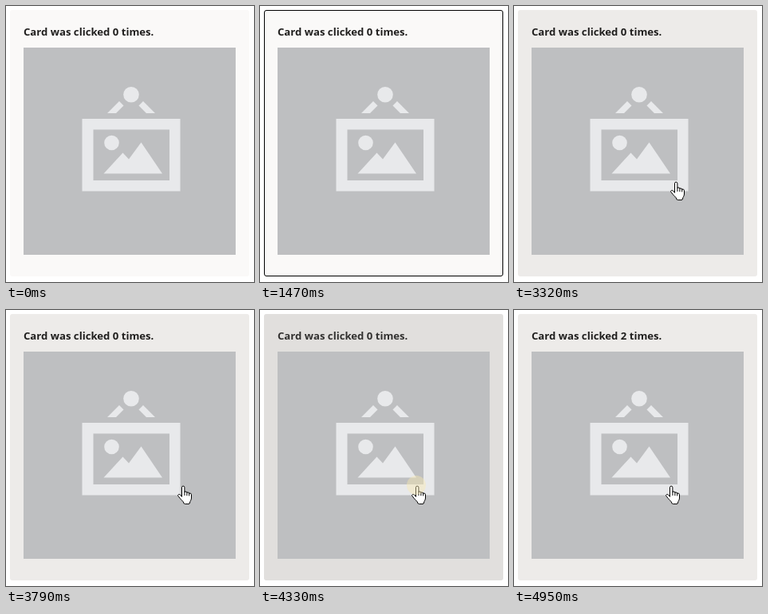
Write an HTML page that moves like this. It is 311 by 345 pixels and loops after 6120 ms.

```html
<!DOCTYPE html>
<html lang="en">
<head>
<meta charset="utf-8">
<title>Clickable card</title>
<style>
  html, body { margin: 0; width: 100%; height: 100%; overflow: hidden; background: #fff; }
  svg { display: block; }
  text { font: 700 13.15px "Open Sans", "Noto Sans", sans-serif; white-space: pre; }
</style>
</head>
<body>
<svg width="311" height="345" viewBox="0 0 311 345">
  <rect id="card" x="5" y="5" width="300" height="333" rx="3"/>
  <rect id="focus" x="5.5" y="5.5" width="299" height="332" rx="2.5" fill="none" stroke="#000"/>
  <text id="label" x="22" y="37"></text>

  <rect x="22" y="52" width="266" height="259" fill="#bebfc1"/>
  <g fill="#e8e9eb">
    <circle cx="157" cy="110.7" r="9.8"/>
    <path d="M127 134 142 119 147.500 124.500 138 134ZM187 134 172 119 166.500 124.500 176 134Z"/>
    <path fill-rule="evenodd" d="M95.500 141H218.500V231.500H95.500ZM109.500 154.500V218H205V154.500Z"/>
    <circle cx="132.500" cy="171" r="9.300"/>
    <path d="M122.500 209.500 146.500 183.500 154 191.500 169.500 170.500 196 209.500Z"/>
  </g>

  <g id="hand" stroke="#000" stroke-linejoin="round" stroke-linecap="round">
    <path fill="#fff" d="M5.500 14V2.800a1.700 1.700 0 0 1 3.400 0V8.200
      q2.600-.9 3 .9 2.500-.7 2.800 1 2.800-.5 2.800 1.700V16
      c0 3-2 4-2 6q-.2 1.400-1.500 1.400H9.500q-1.500 0-1.700-1.400
      C7 19.500 4.500 18.500 3.300 16.500L.9 13.600c-1-1.600 1-3 2.400-1.800Z"/>
    <path fill="none" d="M8.900 8.200V12.500M11.900 9.100V12.800M14.700 10.100V13"/>
  </g>
  <circle id="press" cx="196" cy="219" r="12" fill="#faeaaf" fill-opacity=".42"/>
</svg>

<script>
  const LOOP = 6120;
  const [card, focusRing, label, hand, press] =
    ["card", "focus", "label", "hand", "press"].map(id => document.getElementById(id));

  // Pointer positions: start time, x, y; no position means the pointer is away.
  const pointer = [
    [0], [150, 293, 327], [230],
    [3180, 256, 217], [3250, 225, 218], [3320, 196, 219],
    [3790, 215, 219], [3870, 234, 219], [4100, 238, 223], [4180, 190, 219]
  ];
  const clicks = [[4330, 4480], [4800, 4950]];

  const within = (t, [from, to]) => t >= from && t < to;
  const show = (el, on) => el.setAttribute("visibility", on ? "visible" : "hidden");

  function draw(t) {
    const [, x, y] = pointer.findLast(([start]) => t >= start);
    const hovered = x !== undefined;
    const pressed = clicks.some(span => within(t, span));
    const count = clicks.filter(([, released]) => t >= released).length;

    show(hand, hovered);
    if (hovered) hand.setAttribute("transform", `translate(${x} ${y})`);
    show(press, pressed);
    show(focusRing, within(t, [1470, 2800]));
    card.setAttribute("fill", pressed ? "#e1dfdd" : hovered ? "#edebe9" : "#faf9f8");
    label.setAttribute("fill", pressed ? "#323130" : "#201f1e");
    label.textContent = `Card was clicked ${count} times.`;
  }

  const origin = performance.now();
  function tick() {
    draw((performance.now() - origin) % LOOP);
    requestAnimationFrame(tick);
  }
  tick();
</script>
</body>
</html>
```
